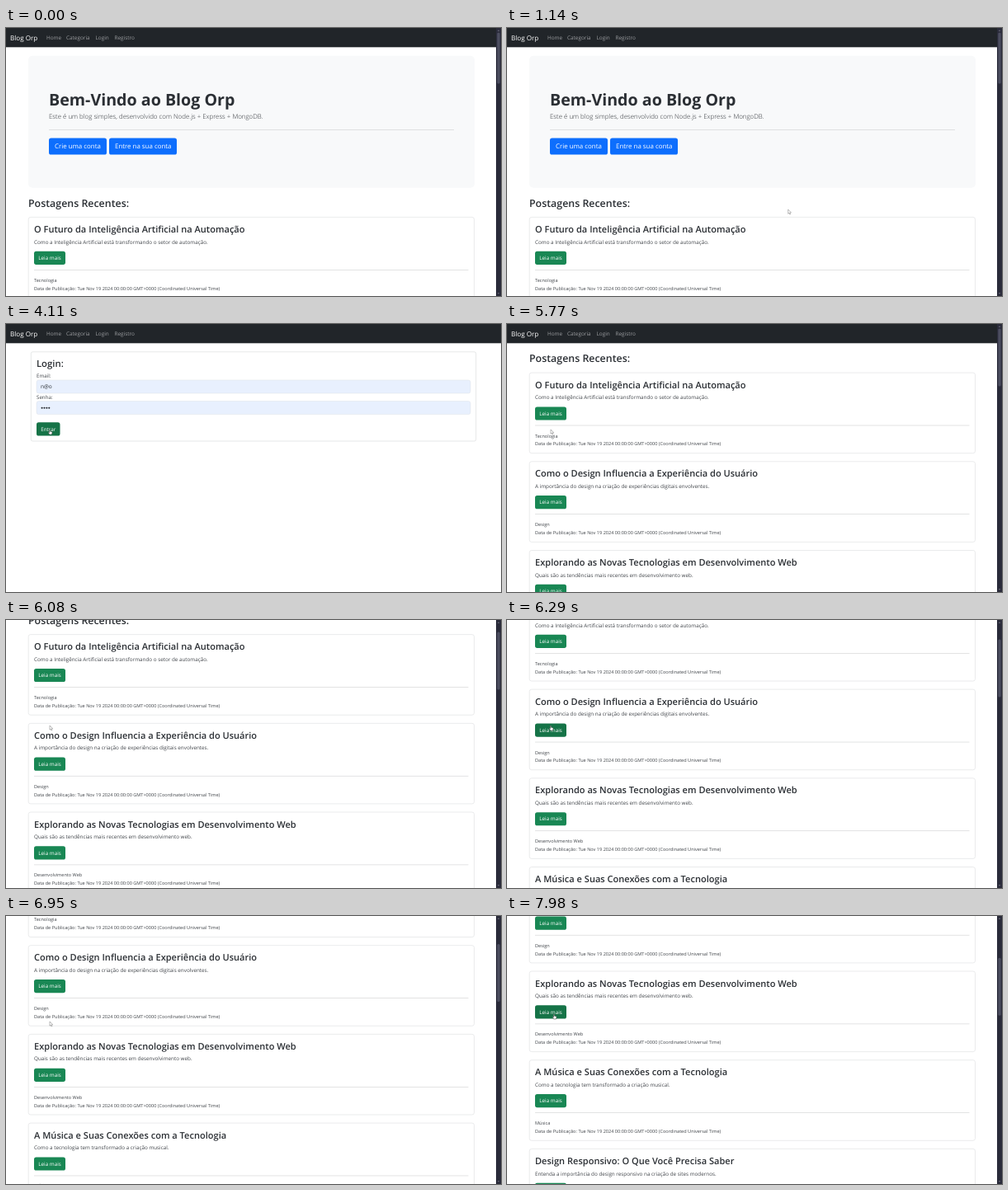
These frames come from a looping animation (600x325 px, 8 s). An HTML page:

```html
<!DOCTYPE html>
<html lang="pt">
<head>
<meta charset="utf-8">
<title>Blog</title>
<style>
  html, body { margin: 0; width: 100%; height: 100%; overflow: hidden; background: #fff; }
  svg { display: block; width: 100vw; height: 100vh; }
  text { font-family: "Open Sans", "Noto Sans", sans-serif; fill: #2b2f34; text-rendering: geometricPrecision; white-space: pre; }
  .small { fill: #41454a; }
</style>
</head>
<body>
<svg id="stage" viewBox="0 0 600 325"></svg>
<script>
const LOOP = 8000;
const BRAND = 'Blog Orp';
const CARD_PITCH = 107.7;
const TICK = 41.5;
const BLUE = ['#0d6efd', '#0b5ed7'];
const GREEN = ['#198754', '#157347'];

const POSTS = [
  ['O Futuro da Inteligência Artificial na Automação', 'Como a Inteligência Artificial está transformando o setor de automação.', 'Tecnologia'],
  ['Como o Design Influencia a Experiência do Usuário', 'A importância do design na criação de experiências digitais envolventes.', 'Design'],
  ['Explorando as Novas Tecnologias em Desenvolvimento Web', 'Quais são as tendências mais recentes em desenvolvimento web.', 'Desenvolvimento Web'],
  ['A Música e Suas Conexões com a Tecnologia', 'Como a tecnologia tem transformado a criação musical.', 'Música'],
  ['Design Responsivo: O Que Você Precisa Saber', 'Entenda a importância do design responsivo na criação de sites modernos.', 'Design'],
];

// Wheel ticks: start and end of each smooth scroll
const SCROLLS = [[5770, 6070], [6160, 6310], [6530, 6685], [6910, 7030], [7280, 7410]];

// Pointer stops: time, x, y
const POINTER = [
  [650, 596, 300], [1420, 232, 186], [1530, 232, 186], [1610, 226, 182], [1890, 226, 182],
  [2200, 150, 145], [3270, 150, 145], [3740, 78, 126], [3880, 78, 126], [4110, 53, 128],
  [7940, 53, 128], [7980, 57, 119],
];

const stage = document.getElementById('stage');

function add(parent, tag, attrs = {}, content) {
  const el = document.createElementNS('http://www.w3.org/2000/svg', tag);
  for (const key in attrs) el.setAttribute(key, attrs[key]);
  if (content) el.textContent = content;
  parent.appendChild(el);
  return el;
}

const text = (parent, x, y, size, content, more) =>
  add(parent, 'text', { x, y, 'font-size': size, ...more }, content);

const rect = (parent, x, y, width, height, fill, more) =>
  add(parent, 'rect', { x, y, width, height, fill, ...more });

const rule = (parent, x, y, width) => rect(parent, x, y, width, 0.6, '#cfd0d1');

function button(page, x, y, w, h, label, size, colors, pad) {
  const el = rect(page.el, x, y, w, h, colors[0], { rx: 2.6 });
  text(page.el, x + pad, y + h / 2 + size * 0.36, size, label, { style: 'fill:#fff' });
  page.buttons.push({ el, x, y, w, h, colors });
}

function navbar(page, width) {
  rect(page.el, 0, 0, width, 23.3, '#212529');
  text(page.el, 5, 14.8, 8.1, BRAND, { style: 'fill:#fff' });
  [['Home', 49], ['Categoria', 73], ['Login', 108.5], ['Registro', 131.5]].forEach(([label, x]) =>
    text(page.el, x, 14.4, 6.4, label, { style: 'fill:#9b9da0' }));
}

function postList(page, top) {
  text(page.el, 27, top - 12.6, 12.4, 'Postagens Recentes:', { 'font-weight': 600 });
  POSTS.forEach(([title, summary, category], i) => {
    const y = top + i * CARD_PITCH;
    rect(page.el, 27.2, y + 0.2, 540.3, 97.6, '#fff', { rx: 2.6, stroke: '#dcdddf', 'stroke-width': 0.6 });
    text(page.el, 34, y + 18.8, 11.05, title, { 'font-weight': 600 });
    text(page.el, 34, y + 32.3, 6.3, summary, { class: 'small' });
    button(page, 34, y + 41.5, 38, 16.2, 'Leia mais', 6.3, GREEN, 5.3);
    rule(page.el, 34, y + 63.8, 526.5);
    text(page.el, 34, y + 78.6, 5.57, category, { class: 'small' });
    text(page.el, 34, y + 88.5, 5.57, 'Data de Publicação: Tue Nov 19 2024 00:00:00 GMT+0000 (Coordinated Universal Time)', { class: 'small' });
  });
}

function makePage(build) {
  const page = { el: add(stage, 'g'), buttons: [] };
  build(page);
  return page;
}

const welcome = makePage(page => {
  navbar(page, 594);
  rect(page.el, 27, 33.8, 541, 160, '#f8f9fa', { rx: 5 });
  text(page.el, 52, 93.6, 19.65, 'Bem-Vindo ao ' + BRAND, { 'font-weight': 700 });
  text(page.el, 52, 110, 7.9, 'Este é um blog simples, desenvolvido com Node.js + Express + MongoDB.', { 'font-weight': 300 });
  rule(page.el, 52, 123, 491);
  button(page, 52, 133.5, 70, 20, 'Crie uma conta', 7.9, BLUE, 7);
  button(page, 125, 133.5, 82, 20, 'Entre na sua conta', 7.9, BLUE, 7);
  postList(page, 229.2);
});

let fields;
const login = makePage(page => {
  navbar(page, 600);
  rect(page.el, 30.3, 33.8, 539.4, 108.2, '#fff', { rx: 2, stroke: '#d6d7d9', 'stroke-width': 0.6 });
  text(page.el, 37, 52, 11.3, 'Login:', { 'font-weight': 600 });
  const box = { rx: 2.6, stroke: '#dee2e6', 'stroke-width': 0.5 };
  text(page.el, 37, 65.2, 6.2, 'Email:', { class: 'small' });
  text(page.el, 37, 91, 6.2, 'Senha:', { class: 'small' });
  fields = [68, 93.6].map(y => rect(page.el, 37, y, 526, 16, '#e8f0fe', box));
  fields.push(text(page.el, 42, 78.3, 6.5, 'n@o'));
  fields.push(add(page.el, 'g', { fill: '#212529' }));
  for (let i = 0; i < 4; i++) add(fields[3], 'circle', { cx: 43.6 + i * 2.9, cy: 101.7, r: 1.05 });
  button(page, 37, 119.3, 28.5, 16.2, 'Entrar', 6.3, GREEN, 5.2);
});

const feed = makePage(page => {
  navbar(page, 594);
  postList(page, 58.9);
});

const bar = add(stage, 'g');
rect(bar, 594, 0, 6, 325, '#2a2b3a');
add(bar, 'path', { d: 'M595.6 4l1.4-2 1.4 2zM595.6 321l1.4 2 1.4-2z', fill: '#5c5d6c' });
const thumb = rect(bar, 595.3, 6, 3.4, 62, '#4c4e60', { rx: 1.5 });

const pointer = add(stage, 'g');
const outline = { fill: '#fff', 'stroke-width': 0.5, 'stroke-linejoin': 'round' };
const arrow = add(pointer, 'path', { d: 'M0 0V5.2L1.2 4.1 2 6 2.9 5.6 2.1 3.8H3.7Z', stroke: '#777', ...outline });
const hand = add(pointer, 'path', { d: 'M-.5 .4Q0-.3.5.4V2.2L2.6 2.7Q3.2 2.9 3 3.7L2.5 6H-.3L-1.7 3.8Q-1.6 3-.5 3.7Z', stroke: '#333', ...outline });

const show = (el, on) => el.setAttribute('display', on ? 'inline' : 'none');
const clamp = v => Math.max(0, Math.min(1, v));
const ease = u => u < 0.5 ? 4 * u ** 3 : 1 - 4 * (1 - u) ** 3;
const smooth = u => u * u * (3 - 2 * u);

function pointerAt(t) {
  let [, x, y] = POINTER[0];
  for (let i = 1; i < POINTER.length; i++) {
    const [from, x0, y0] = POINTER[i - 1];
    const [to, x1, y1] = POINTER[i];
    if (t < from) break;
    const u = smooth(clamp((t - from) / (to - from)));
    x = x0 + (x1 - x0) * u;
    y = y0 + (y1 - y0) * u;
  }
  return [x, y];
}

function render(t) {
  const page = t < 2770 ? welcome : t < 5000 ? login : feed;
  [welcome, login, feed].forEach(p => show(p.el, p === page));
  fields.forEach((el, i) => {
    if (i < 2) el.setAttribute('fill', t < 2850 ? '#fff' : '#e8f0fe');
    else show(el, t >= 2850);
  });

  const scroll = SCROLLS.reduce((sum, [from, to]) => sum + TICK * ease(clamp((t - from) / (to - from))), 0);
  feed.el.setAttribute('transform', `translate(0 ${-scroll})`);

  show(bar, page !== login);
  thumb.setAttribute('y', 5.6 + scroll * 0.217);
  thumb.setAttribute('height', page === feed ? 70 : 62);

  const [x, y] = pointerAt(t);
  const pageY = y + (page === feed ? scroll : 0);
  const visible = t >= 650;
  let over = false;
  for (const b of page.buttons) {
    const hit = visible && x >= b.x && x <= b.x + b.w && pageY >= b.y && pageY <= b.y + b.h;
    b.el.setAttribute('fill', b.colors[hit ? 1 : 0]);
    over = over || hit;
  }
  show(pointer, visible);
  show(arrow, !over);
  show(hand, over);
  pointer.setAttribute('transform', `translate(${x} ${y})`);
}

const start = performance.now();
function tick() {
  render((performance.now() - start) % LOOP);
  requestAnimationFrame(tick);
}
tick();
</script>
</body>
</html>
```
